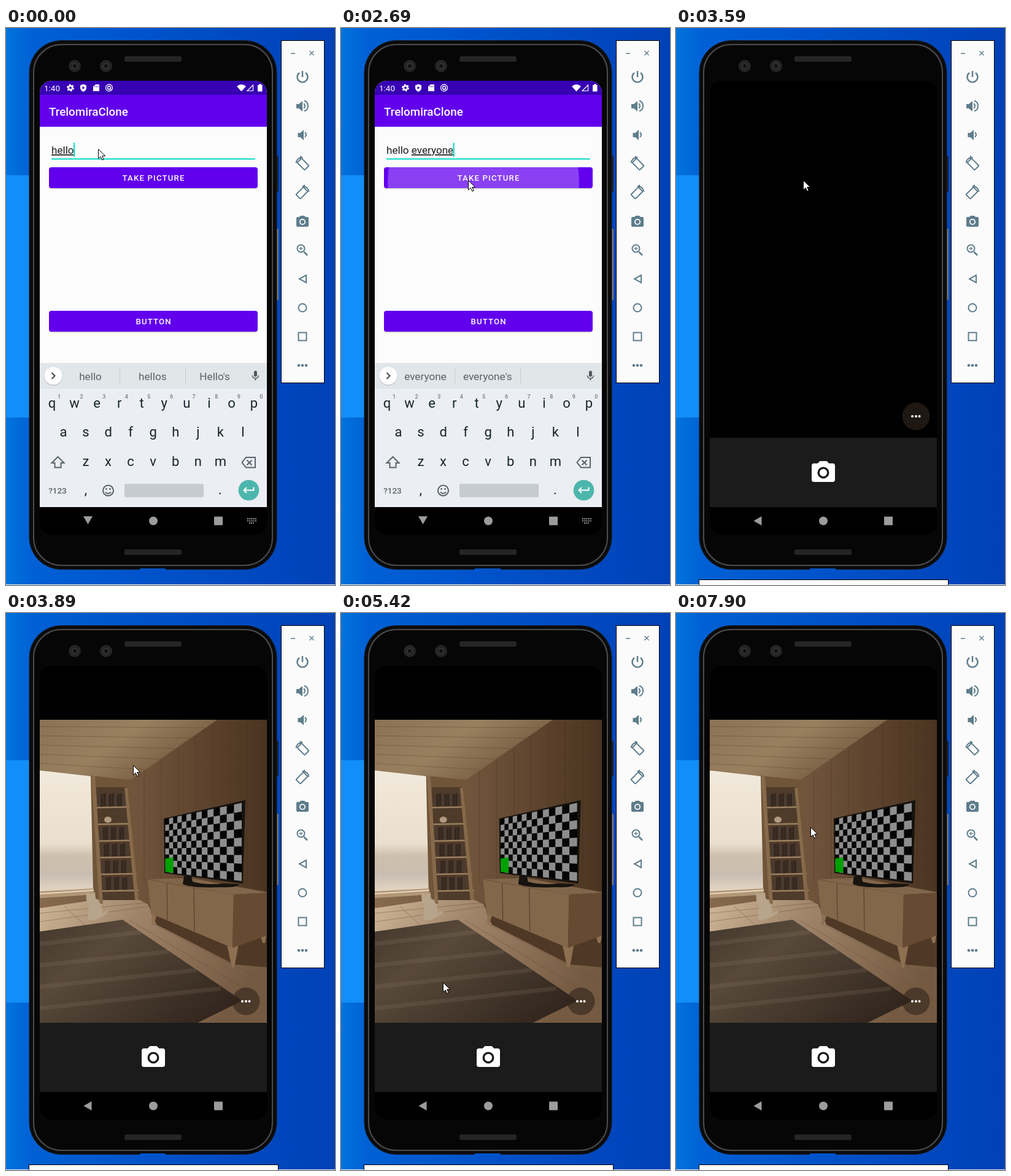
Recreate the animation shown at these times as an HTML page. Size 536x908 px, loop 8 s.

```html
<!DOCTYPE html>
<html lang="en">
<head>
<meta charset="utf-8">
<title>Phone emulator</title>
<style>
  html, body { margin: 0; height: 100%; overflow: hidden; background: #0050c8; }
  svg { display: block; width: 536px; height: 908px; }
  text { font-family: Roboto, sans-serif; white-space: pre; }
  .mid { text-anchor: middle; }
  .line { fill: none; stroke: currentColor; stroke-width: 2; }
  .btn { font-size: 13.2px; font-weight: 500; letter-spacing: 1.18px; fill: #fff; }
  .tools { fill: #5f7d8b; color: #5f7d8b; }
</style>
</head>
<body>
<svg viewBox="0 0 536 908">
  <defs>
    <linearGradient id="wallpaper">
      <stop offset="0" stop-color="#0074de"/><stop offset=".08" stop-color="#0060d4"/>
      <stop offset=".5" stop-color="#0050c8"/><stop offset="1" stop-color="#0041b6"/>
    </linearGradient>
    <linearGradient id="wall">
      <stop offset="0" stop-color="#886b4e"/><stop offset=".5" stop-color="#6c5038"/><stop offset="1" stop-color="#493320"/>
    </linearGradient>
    <linearGradient id="ceiling" x2="1" y2=".5">
      <stop offset="0" stop-color="#8b7154"/><stop offset=".5" stop-color="#98805f"/><stop offset="1" stop-color="#70563c"/>
    </linearGradient>
    <linearGradient id="view" x2="0" y2="1">
      <stop offset="0" stop-color="#f1e9db"/><stop offset=".6" stop-color="#eadfce"/>
      <stop offset=".7" stop-color="#cfc0ac"/><stop offset=".85" stop-color="#c9bdb2"/><stop offset="1" stop-color="#e5d7c2"/>
    </linearGradient>
    <linearGradient id="floor" x2="1" y2=".4">
      <stop offset="0" stop-color="#d0b899"/><stop offset=".4" stop-color="#a0856a"/><stop offset="1" stop-color="#755a42"/>
    </linearGradient>
    <linearGradient id="rug" x2="1" y2=".7">
      <stop offset="0" stop-color="#43372c"/><stop offset=".35" stop-color="#58493a"/><stop offset="1" stop-color="#32261e"/>
    </linearGradient>
    <clipPath id="screen"><rect x="55" y="86" width="370" height="740" rx="20"/></clipPath>
    <clipPath id="photo"><rect x="55" y="174" width="370" height="494"/></clipPath>
    <clipPath id="button"><rect x="70" y="227" width="340" height="34" rx="4"/></clipPath>
    <path id="camera" fill-rule="evenodd" transform="translate(-12 -11)" d="M9 2L7.17 4H4a2 2 0 0 0-2 2v12a2 2 0 0 0 2 2h16a2 2 0 0 0 2-2V6a2 2 0 0 0-2-2h-3.17L15 2zm3 5a5 5 0 0 1 0 10a5 5 0 0 1 0-10zm0 1.8a3.2 3.2 0 0 0 0 6.4a3.2 3.2 0 0 0 0-6.4z"/>
    <g id="rotate">
      <rect class="line" x="-8.500" y="-5" width="17" height="10" rx="1" transform="translate(1 1) rotate(45)"/>
      <path class="line" d="M-10.500-1a11 11 0 0 1 8-9"/><path d="M-4-13l5 3-5 3.500z"/>
    </g>
  </defs>

  <rect width="536" height="908" fill="url(#wallpaper)"/>
  <rect x="-357" y="240" width="395" height="395" fill="#128ef8"/>
  <rect y="907" width="536" height="1" fill="#f4f4f4"/>

  <!-- phone body -->
  <rect x="438" y="208" width="6" height="59" rx="2" fill="#1c2030"/>
  <rect x="438" y="327" width="6" height="117" rx="2" fill="#777"/>
  <rect x="38" y="20.500" width="403" height="862" rx="52" fill="#0b0b0b" stroke="#1a1a1a"/>
  <rect x="218" y="881" width="42" height="3" fill="#0054cc"/>
  <rect x="45" y="27" width="389" height="849" rx="45" fill="#060606" stroke="#4c4c4c" stroke-width="2"/>
  <g fill="#252525">
    <rect x="193" y="46" width="93" height="9" rx="3"/><rect x="193" y="850" width="93" height="9" rx="3"/>
    <circle cx="112" cy="62" r="10"/><circle cx="163" cy="62" r="10"/>
  </g>
  <g fill="#111" stroke="#444"><circle cx="112" cy="62" r="4"/><circle cx="163" cy="62" r="4"/></g>

  <g clip-path="url(#screen)">
    <rect x="55" y="86" width="370" height="740"/>
    <g id="app">
      <rect x="55" y="86" width="370" height="695" fill="#fcfcfc"/>
      <rect x="55" y="109" width="370" height="52" fill="#6200ee"/>
      <rect x="55" y="86" width="370" height="23" fill="#3700b3"/>
      <text x="70" y="142.500" font-size="18.800" font-weight="500" fill="#fff">TrelomiraClone</text>
      <text id="input" x="74" y="205" font-size="17.100" fill="#1d1d1d"><tspan></tspan><tspan></tspan></text>
      <rect id="caret" y="187" width="2" height="23" fill="#03dac5"/>
      <rect x="74" y="212.500" width="332" height="2" fill="#03dac5"/>
      <rect x="70" y="228.500" width="340" height="34" rx="4" opacity=".18"/>
      <rect x="70" y="462.500" width="340" height="34" rx="4" opacity=".18"/>
      <rect x="70" y="227" width="340" height="34" rx="4" fill="#6200ee"/>
      <rect x="70" y="461" width="340" height="34" rx="4" fill="#6200ee"/>
      <circle id="ripple" cx="232" cy="250" fill="#fff" clip-path="url(#button)"/>
      <text class="btn mid" x="240.600" y="249">TAKE PICTURE</text>
      <text class="btn mid" x="240.600" y="483">BUTTON</text>
    </g>
    <g id="splash">
      <rect x="69" y="114" width="342" height="684" opacity=".38"/>
      <use href="#camera" transform="translate(240 433) scale(2.350)" fill="#b9bec1"/>
    </g>
    <g fill="#9c9c9c">
      <path id="back" d="M126 796h15l-7.500 13z"/>
      <circle cx="240" cy="803.500" r="7"/><rect x="339" y="796.500" width="14" height="14" rx="1"/>
    </g>
    <path id="switcher" d="M393 800h15M393 803.500h15M396 807h8" stroke="#9c9c9c" stroke-width="1.800" stroke-dasharray="2 1.200"/>
    <g id="keyboard">
      <rect x="55" y="546" width="370" height="235" fill="#ebeef3"/>
      <rect x="55" y="546" width="370" height="42" fill="#e1e6e9"/>
      <circle cx="77" cy="568" r="15" opacity=".15"/><circle cx="77" cy="567" r="14.500" fill="#fff"/>
      <path d="M74.500 562l5 5-5 5" class="line" color="#444"/>
      <path d="M185.500 555v24M292.500 555v24" stroke="#c3cace"/>
      <g id="suggestions" class="mid" font-size="17.200" fill="#586368"></g>
      <path transform="translate(396.500 557) scale(.83)" fill="#4d595f" d="M12 14a3 3 0 0 0 3-3V5a3 3 0 0 0-6 0v6a3 3 0 0 0 3 3zm5.300-3a5.300 5.300 0 0 1-10.600 0H5a7 7 0 0 0 6 6.720V21h2v-3.280A7 7 0 0 0 19 11z"/>
      <g id="keys" class="mid" font-size="22" fill="#17242b"></g>
      <g color="#58646b">
        <path class="line" d="M84.500 699l-10 10h5v7.500h10V709h5z"/>
        <path class="line" d="M391 700h15v16.500h-15l-6.500-8.250zM392.500 704.500l8 8m0-8l-8 8"/>
        <circle class="line" cx="166.500" cy="754" r="8.500"/>
        <path class="line" d="M162 756.500q4.500 5 9 0"/>
      </g>
      <circle cx="163.500" cy="751.500" r="1.400" fill="#58646b"/><circle cx="169.500" cy="751.500" r="1.400" fill="#58646b"/>
      <text class="mid" x="84" y="758.500" font-size="13.500" font-weight="500" fill="#58646b">?123</text>
      <rect x="193" y="743" width="129" height="22" rx="2" fill="#c6cbcf"/>
      <circle cx="395.500" cy="753.500" r="16.800" fill="#4db6ac"/>
      <path class="line" color="#fff" d="M403.500 748.500v5h-16m4.500-4.500l-4.500 4.500 4.500 4.500"/>
    </g>
    <g id="status" fill="#fff">
      <text x="62" y="102.500" font-size="13.500">1:40</text>
      <circle cx="105" cy="97.500" r="3.300" fill="none" stroke="#fff" stroke-width="2.600"/>
      <circle cx="105" cy="97.500" r="5" fill="none" stroke="#fff" stroke-width="2" stroke-dasharray="2.600"/>
      <path fill-rule="evenodd" d="M126 91.500l5 2v4q0 4-5 6.500-5-2.500-5-6.500v-4zM124.500 95v5l4-2.500z"/>
      <path fill-rule="evenodd" d="M146 92h6v11h-10v-7.500zm-1.500 2.500v2h1v-2zm2.500 0v2h1v-2zm2.500 0v2h1v-2z"/>
      <circle cx="168" cy="97.500" r="5.500" fill="none" stroke="#fff" stroke-width="1.300"/>
      <circle cx="168" cy="97.500" r="2.500" fill="none" stroke="#fff" stroke-width="1.500"/><path d="M168 98l4 3-1 1z"/>
      <path d="M376 95q7.500-6 15 0l-7.500 8.500z"/>
      <path d="M393 102.500h9.500V93z" fill="none" stroke="#fff" stroke-width="1.200"/>
      <path d="M410 93h2v-1.500h4V93h1.500v10.500H410z"/>
    </g>

    <g id="viewer">
      <rect x="55" y="86" width="370" height="695"/>
      <g clip-path="url(#photo)">
        <g id="room">
          <rect x="50" y="170" width="380" height="500" fill="url(#wall)"/>
          <path d="M50 170H350L203 272 138 266 50 255z" fill="url(#ceiling)"/>
          <path id="planks" stroke="#3a281a" stroke-opacity=".28" fill="none"/>
          <path d="M136 265L203 272 218 475H136z" fill="#705539"/>
          <path d="M50 256L138 266 142 450 50 455z" fill="url(#view)"/>
          <path d="M50 454L143 449V459L50 465z" fill="#b29776"/>
          <path d="M50 458L143 452" stroke="#e8d8bf" stroke-width="2"/>
          <path d="M50 482L150 467 218 468 430 580V680H50z" fill="url(#floor)"/>
          <path d="M50 490L230 472M50 504L235 478M95 478L130 510M200 500L425 634M235 505L425 602" stroke="#60482f" stroke-opacity=".4" fill="none"/>
          <path d="M232 475L370 535 430 515V578L372 573 245 508z" fill="#4f3926"/>
          <path d="M50 520L190 500 385 632 304 672H50z" fill="url(#rug)"/>
          <path d="M50 540L220 520M50 575L265 552M50 610L310 582M50 645L350 612" stroke="#958069" stroke-opacity=".17" stroke-width="7"/>
          <path d="M147 284H197L211 468H155z" fill="#4f3b29"/>
          <g id="shelves"></g>
          <path d="M139 265h6L158 474h-6zM193 285h5L216 468h-6z" fill="#866a4b"/>
          <ellipse cx="166" cy="337" rx="6" ry="5" fill="#b09b81"/>
          <path d="M131 455l5 3 6-1 3-2 1 10q11 8 11 24l9-4v4l-12 7q-14 8-21 3l2-22q-6-8-4-22z" fill="#b7a48b"/>
          <path d="M237 488h10l-6 19h-3zM360 540h19l-7 38h-4zM413 520h12l-3 18h-4z" fill="#8c7051"/>
          <path d="M232 434L300 432 430 456 371 459z" fill="#80664a"/>
          <path d="M231 435L371 459 369 546 236 490z" fill="#83674a"/>
          <path d="M371 459L430 456V524L369 546z" fill="#664a32"/>
          <path d="M262 441l1 60M306 448l1 70" stroke="#4f3826"/>
          <path d="M290 429l12-1 2 10q20 6 50 3l26 1q-3 6-30 5-45 2-62-5z" fill="#17130f"/>
          <path d="M257 335L390 305 386 441 258 424z" fill="#17130f"/>
          <path d="M259.500 336L384 309.500V437L259.500 422.500z" fill="#050505"/>
          <path id="checks" fill="#8d8d8d"/>
          <path d="M259.500 400L272.500 398.500V423.500L259.500 422z" fill="#00a000"/>
        </g>
        <circle cx="391" cy="633" r="22.500" fill="#33261c" opacity=".62"/>
        <path d="M385 633h.01M391 633h.01M396.500 633h.01" stroke="#fff" stroke-width="4" stroke-linecap="round"/>
      </g>
      <rect x="55" y="668" width="370" height="113" fill="#1b1b1b"/>
      <use href="#camera" transform="translate(240 723) scale(1.900)" fill="#fff"/>
    </g>
  </g>

  <rect id="panel" x="37.500" y="899.500" width="406" height="20" fill="#fbfbfb" stroke="#000"/>

  <!-- emulator toolbar -->
  <rect x="448.500" y="20.500" width="70" height="558" fill="#fbfbfb" stroke="#000"/>
  <g class="tools">
    <path d="M464 41.500h7M494.500 37.500l7 7m0-7l-7 7" class="line" style="stroke-width:1.400"/>
    <path d="M483 70v10M478 73a8.500 8.500 0 1 0 10 0" class="line" style="stroke-width:2.400"/>
    <path d="M473 124h4l6-5v17l-6-5h-4z"/>
    <path d="M485 123q4 4 0 8M486 118.500a9 9 0 0 1 0 17" class="line"/>
    <path d="M475.500 171h4l5.500-5v17l-5.500-5h-4z"/><path d="M487 170q4 4 0 8" class="line"/>
    <use href="#rotate" transform="translate(483 221)"/>
    <use href="#rotate" transform="translate(483 268) scale(-1 1)"/>
    <use href="#camera" transform="translate(483 315)"/>
    <path d="M485.500 365l5.500 5.500" class="line" style="stroke-width:2.600"/>
    <circle class="line" cx="480.500" cy="359.500" r="6"/><path d="M477.500 359.500h6M480.500 356.500v6" class="line" style="stroke-width:1.300"/>
    <path d="M489 403v12l-11-6z" class="line"/><circle class="line" cx="483" cy="456" r="6.500"/>
    <rect class="line" x="476.500" y="496.500" width="13" height="13"/>
    <circle cx="477" cy="550" r="2.300"/><circle cx="483" cy="550" r="2.300"/><circle cx="489" cy="550" r="2.300"/>
  </g>
  <path id="mouse" d="M.5.500v15.500l3.700-3.400 2.600 5.600 2.400-1-2.500-5.600h5z" fill="#fff" stroke="#000"/>
</svg>
<script>
const $ = id => document.getElementById(id);
const show = (id, on) => $(id).style.display = on ? '' : 'none';
const label = (s, x, y, extra = '') => `<text x="${x}" y="${y}" ${extra}>${s}</text>`;

// Keyboard letters
const row = (letters, x, y) => [...letters].map((c, i) => label(c, x + 36.55 * i, y)).join('');
$('keys').innerHTML = row('qwertyuiop', 75, 619) + row('asdfghjkl', 93.5, 666) + row('zxcvbnm', 130, 714) +
  label(',', 130, 760) + label('.', 349, 760) +
  [...'1234567890'].map((c, i) => label(c, 86.5 + 36.6 * i, 604, 'font-size="9" font-weight="500" fill="#707b81"')).join('');

// Television checkerboard in perspective
const COLS = 14, ROWS = 9, depth = 87 / 127;
const corner = (c, r) => {
  const u = c / COLS, f = u * depth / (u * depth + 1 - u);
  const top = 336 - 26.5 * f, bottom = 422.5 + 14.5 * f;
  return `${259.5 + 124.5 * f} ${top + (bottom - top) * r / ROWS}`;
};
let checks = '';
for (let c = 0; c < COLS; c++)
  for (let r = (c + 1) % 2; r < ROWS; r += 2)
    checks += `M${corner(c, r)}L${corner(c + 1, r)}L${corner(c + 1, r + 1)}L${corner(c, r + 1)}z`;
$('checks').setAttribute('d', checks);

// Wood boards and bookshelf
let planks = '';
for (let i = 0; i < 8; i++) planks += `M${225 + i * 28} ${257 - i * 19}V440`;
for (let i = 1; i < 6; i++) planks += `M50 ${170 + i * 15}L${350 - i * 25} ${170 + i * 17}`;
$('planks').setAttribute('d', planks);
let shelves = '';
for (let i = 0; i < 6; i++) {
  const y = 316 + i * 27.2, x = 148 + i * 1.7;
  if (i !== 1) for (let b = 0; b < 10; b++)
    shelves += `<rect x="${x + 2 + b * 4.4}" y="${y - 20 - b * 7 % 3}" width="3.8" height="21" fill="${b % 3 ? '#352820' : '#4a3b31'}"/>`;
  shelves += `<path d="M${x} ${y}l${50 + i * 2} -1v2.5l${-50 - i * 2} 1z" fill="#9c8060"/>`;
}
$('shelves').innerHTML = shelves;

// [start, text before, word being composed, suggestions]
const typing = [
  [0, '', 'hello', ['hello', 'hellos', "Hello's"]],
  [150, 'hello ', '', ['there', 'and', 'I']],
  [430, 'hello ', 'e', ['e', 'everyone', 'every']],
  [560, 'hello ', 'ev', ['ev', 'everyone', 'every']],
  [690, 'hello ', 'eve', ['eve', 'everyone', 'even']],
  [820, 'hello ', 'ever', ['ever', 'everyone', 'everything']],
  [1110, 'hello ', 'every', ['every', 'everyone', 'everything']],
  [1390, 'hello ', 'everyo', ['everyo', 'everyone', "everyone's"]],
  [1540, 'hello ', 'everyon', ['everyon', 'everyone', "everyone's"]],
  [2000, 'hello ', 'everyone', ['everyone', "everyone's", '']]
];
const zoom = [[0, 1], [2990, 1.006], [3140, 1.0115], [3440, 1.0235]];
const path = [
  [0, 150, 197], [1990, 150, 197], [2420, 207, 248], [4130, 207, 248], [4390, 200, 330],
  [5100, 166, 602], [5500, 166, 602], [6350, 231, 609], [6620, 231, 609],
  [7100, 228, 200], [7620, 219, 349], [8000, 219, 349]
];
const latest = (steps, t) => steps.findLast(s => s[0] <= t);
const [before, word] = $('input').children;

function draw(t) {
  const opened = t >= 3580;
  for (const id of ['app', 'keyboard', 'status']) show(id, !opened);
  show('splash', t >= 3440 && !opened);
  show('switcher', t < 3440);
  show('panel', t >= 3440);
  show('viewer', opened);
  show('room', t >= 3720);
  $('back').setAttribute('transform', opened ? 'translate(-1.5 0) rotate(90 133.5 803.5)' : '');
  $('room').setAttribute('transform', `translate(${Math.sin((t - 3890) * Math.PI / 2000)} 0)`);

  const [, done, composing, hints] = latest(typing, t);
  before.textContent = done;
  word.textContent = composing;
  word.setAttribute('text-decoration', t < 3140 ? 'underline' : 'none');
  $('caret').setAttribute('x', 73.5 + $('input').getComputedTextLength());
  $('suggestions').innerHTML = hints.map((s, i) => label(s, 137.5 + 101.3 * i, 573.5)).join('');

  const s = latest(zoom, t)[1];
  for (const id of ['app', 'keyboard'])
    $(id).setAttribute('transform', `translate(240 456) scale(${s}) translate(-240 -456)`);

  $('ripple').setAttribute('r', Math.max(0, Math.min(220, (t - 2500) / 190 * 155)));
  $('ripple').setAttribute('opacity', t < 2550 || t >= 3140 ? 0 : t < 2840 ? .25 : .25 * (3140 - t) / 300);

  const i = path.findLastIndex(p => p[0] <= t), [t0, x0, y0] = path[i], [t1, x1, y1] = path[i + 1];
  const k = (t - t0) / (t1 - t0);
  $('mouse').setAttribute('transform', `translate(${x0 + (x1 - x0) * k} ${y0 + (y1 - y0) * k})`);
}

function tick() {
  draw(performance.now() % 8000);
  requestAnimationFrame(tick);
}
tick();
</script>
</body>
</html>
```
